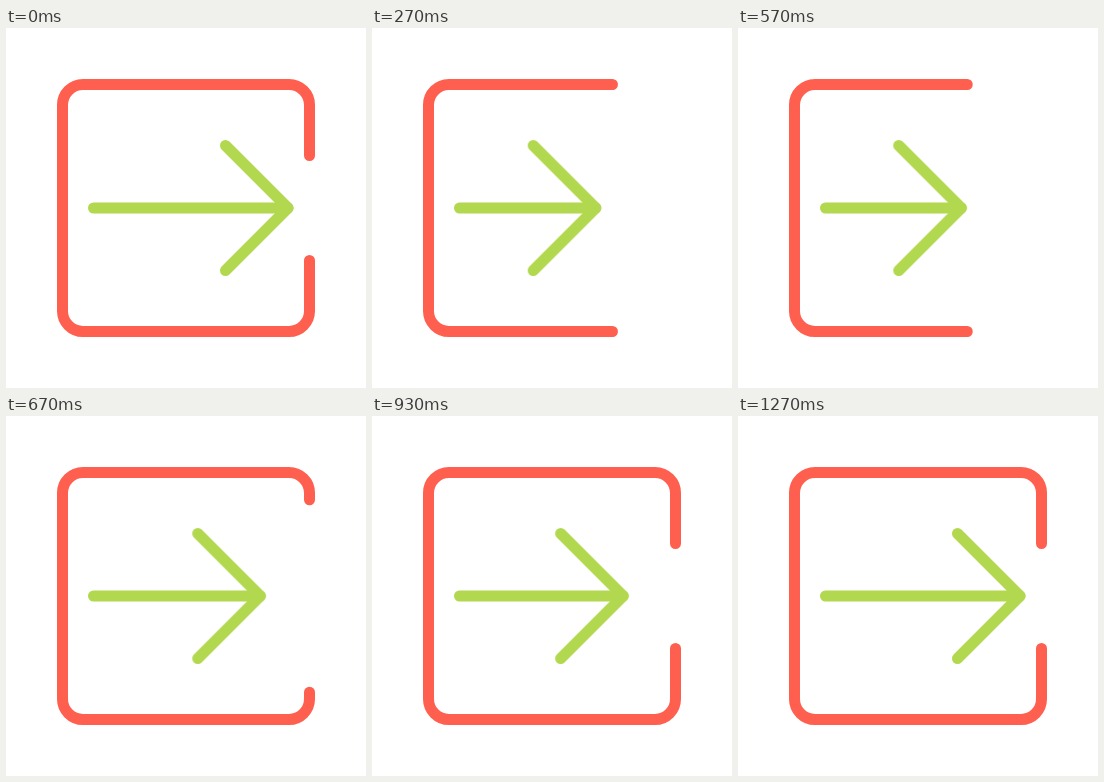
An HTML page that plays this animation: 360x360 px, repeating every 2000 ms.

```html
<!DOCTYPE html>
<html lang="en">
<head>
<meta charset="utf-8">
<title>Exit arrow</title>
<style>
  html, body { margin: 0; width: 100%; height: 100%; overflow: hidden; background: #fff; }
  svg { display: block; width: 100vw; height: 100vh; }
  path { fill: none; stroke-width: 11; stroke-linecap: round; stroke-linejoin: round; }
  .box { stroke: #ff5f4e; stroke-dasharray: 423.9 999; }
  .arrow { stroke: #b1d84f; }
  #shaft { stroke-dasharray: 194.5 999; }
</style>
</head>
<body>
<svg viewBox="0 0 360 360">
  <path class="box" d="M56.5 180V77A20.5 20.5 0 0 1 77 56.5H283A20.5 20.5 0 0 1 303.5 77V127.5"/>
  <path class="box" d="M56.5 180V283A20.5 20.5 0 0 0 77 303.5H283A20.5 20.5 0 0 0 303.5 283V232.5"/>
  <path class="arrow" id="shaft" d="M87.5 180H282"/>
  <path class="arrow" id="head" d="M219.5 117.5L282 180L219.5 242.5"/>
</svg>
<script>
const LOOP = 2000, FPS = 30, LAST = 38;

// [step, distance pulled back from rest]
const pull = [[0, 0], [13, 86], [22, 20], [27.5, 31], [38, 0]];
const trim = [[0, 0], [13.5, 195], [23, 0], [38, 0]];

const ease = p => (1 - Math.cos(Math.PI * p)) / 2;

function valueAt(track, step) {
  const i = Math.max(1, track.findIndex(k => k[0] >= step));
  const [s0, v0] = track[i - 1], [s1, v1] = track[i];
  return v0 + (v1 - v0) * ease((step - s0) / (s1 - s0));
}

function play(el, track, pose) {
  const frames = [];
  for (let step = 0; step <= LAST; step++) {
    const ms = Math.round(step * 100 / FPS) * 10;
    frames.push({ ...pose(valueAt(track, step)), offset: ms / LOOP, easing: 'step-end' });
  }
  frames.push({ ...pose(0), offset: 1 });
  el.animate(frames, { duration: LOOP, iterations: Infinity });
}

const dash = v => ({ strokeDashoffset: v.toFixed(2) + 'px' });
const slide = v => ({ transform: `translateX(${(-v).toFixed(2)}px)` });

document.querySelectorAll('.box').forEach(el => play(el, trim, dash));
play(document.getElementById('shaft'), pull, dash);
play(document.getElementById('head'), pull, slide);
</script>
</body>
</html>
```
